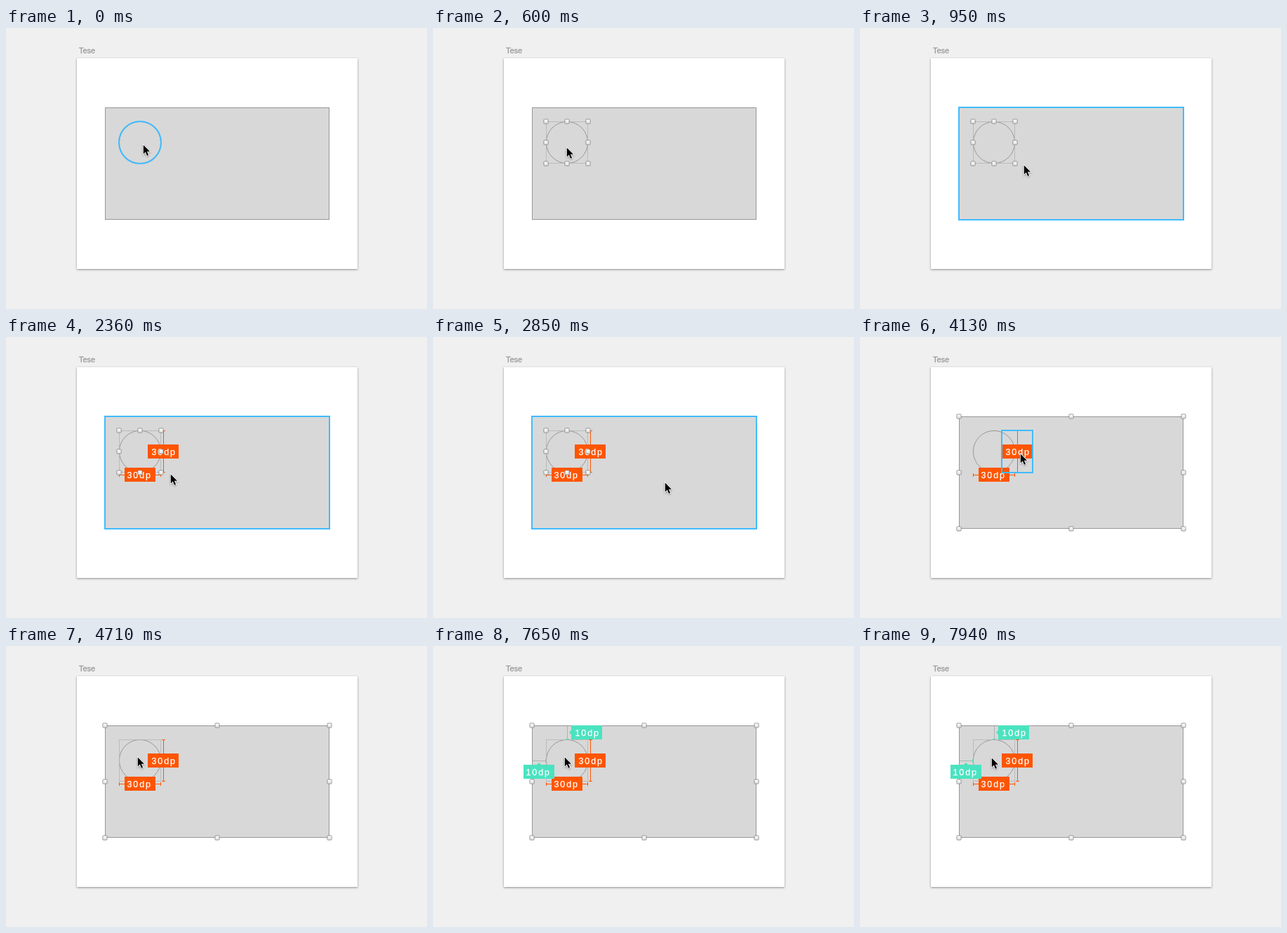
Recreate the animation shown at these times as an HTML page. Size 600 by 400 pixels, loop 8000 ms.

```html
<!DOCTYPE html>
<html>
<head>
<meta charset="utf-8">
<style>
html, body { margin: 0; width: 100%; height: 100%; overflow: hidden; background: #f0f0f0; }
svg { display: block; width: 600px; height: 400px; }
text { font-family: "Liberation Sans", Arial, sans-serif; }
.board { filter: drop-shadow(0 1px 1.5px rgba(0,0,0,.42)); }
.shape { fill: #d8d8d8; stroke: #979797; }
.hover { fill: none; stroke: #40bcff; stroke-width: 2; }
.box { fill: none; stroke: #b5b5b5; stroke-width: .8; }
.handle { fill: url(#knob); stroke: #999; stroke-width: .8; filter: drop-shadow(0 .6px .5px rgba(0,0,0,.3)); }
.size { fill: #ff5500; }
.gap { fill: #4ae3c0; }
.label { font-size: 12.5px; letter-spacing: 1.9px; fill: #fff; stroke: #fff; stroke-width: .25; }
#cursor { filter: drop-shadow(0 1px .8px rgba(0,0,0,.35)); }
</style>
</head>
<body>
<svg viewBox="0 0 600 400">
  <defs>
    <linearGradient id="knob" x2="0" y2="1">
      <stop stop-color="#fff"/><stop offset="1" stop-color="#dedede"/>
    </linearGradient>
  </defs>
  <rect width="600" height="400" fill="#f0f0f0"/>
  <text x="104" y="36" font-size="11" fill="#999" stroke="#999" stroke-width=".3">Tese</text>
  <rect class="board" x="101" y="43" width="400" height="300" fill="#fff"/>
  <rect class="shape" x="141.5" y="113.5" width="319" height="159"/>
  <circle class="shape" cx="191" cy="163" r="29.6"/>
  <rect id="circleBox" class="box" x="161.5" y="133.5" width="59" height="59"/>

  <g id="sizes">
    <path class="size" d="M224 133h1v60h-1z M222 133h5v1h-5z M222 192h5v1h-5z M202 153h44v20h-44z"/>
    <text class="label" x="207.5" y="167.5">30dp</text>
    <path class="size" d="M161 196h60v1h-60z M161 194h1v5h-1z M220 194h1v5h-1z M169 186h44v20h-44z"/>
    <text class="label" x="172.5" y="200.5">30dp</text>
  </g>

  <g id="gaps">
    <path d="M191.5 114v19M142 163.5h19" stroke="#a8b5b1"/>
    <path class="gap" d="M189 132h5v1h-5z M160 161h1v5h-1z"/>
    <path class="gap" d="M197 113h44v20h-44v-7l-3-3 3-3z"/>
    <text class="label" x="202.5" y="127.5">10dp</text>
    <path class="gap" d="M129 169h19l3-3 3 3h19v20h-44z"/>
    <text class="label" x="132.5" y="183.5">10dp</text>
  </g>

  <g id="circleHandles"></g>
  <g id="rectHandles"></g>
  <rect id="rectHover" class="hover" x="141" y="113" width="320" height="160"/>
  <circle id="circleHover" class="hover" cx="191" cy="163" r="30"/>
  <rect id="sizeHover" class="hover" x="202" y="133" width="44" height="60"/>
  <path id="cursor" d="M.8 1.4V14.4L3.8 11.6 6 16.8 8.1 15.9 5.9 10.8H10z" stroke="#fff" stroke-width="1.6" paint-order="stroke"/>
</svg>
<script>
const LOOP = 8000;
const $ = id => document.getElementById(id);
const show = (id, on) => { $(id).style.display = on ? "" : "none"; };

// Eight resize knobs around a box.
function addHandles(id, x, y, w, h) {
  let out = "";
  for (const i of [0, 1, 2]) for (const j of [0, 1, 2]) {
    if (i === 1 && j === 1) continue;
    out += `<rect class="handle" x="${x + w * i / 2 - 3}" y="${y + h * j / 2 - 3}" width="6" height="6" rx=".8"/>`;
  }
  $(id).innerHTML = out;
}
addHandles("circleHandles", 161, 133, 60, 60);
addHandles("rectHandles", 141, 113, 320, 160);

// Pointer moves: first step, last step, step count, destination, ease-out power.
const moves = [
  [60, 240, 3, 190, 169, 1],
  [770, 950, 4, 233, 194, 1.3],
  [2030, 2030, 1, 234, 194, 1],
  [2680, 2850, 4, 330, 206, 1.3],
  [3930, 4130, 5, 228, 165, 1.2],
  [4180, 4530, 8, 187, 157, 2.2],
  [7940, 7940, 1, 187, 158, 1]
];

function pointer(t) {
  let x = 195, y = 165;
  for (const [start, end, count, toX, toY, power] of moves) {
    if (t < start) break;
    const gap = (end - start) / (count - 1) || 1;
    const step = Math.min(count, Math.floor((t - start) / gap + 1e-6) + 1);
    const p = 1 - (1 - step / count) ** power;
    x += (toX - x) * p;
    y += (toY - y) * p;
  }
  return [Math.round(x), Math.round(y)];
}

function draw(t) {
  const [x, y] = pointer(t);
  const inCircle = Math.hypot(x - 191, y - 163) < 30;
  const inSize = x >= 202 && x <= 246 && y >= 133 && y <= 193;
  const circlePicked = t >= 600 && t < 3810;
  const rectPicked = t >= 3810;
  const roaming = rectPicked && t < 4710;

  $("cursor").setAttribute("transform", `translate(${x} ${y})`);
  show("circleBox", circlePicked || t >= 4710);
  show("circleHandles", circlePicked);
  show("rectHandles", rectPicked);
  show("rectHover", circlePicked && !inCircle);
  show("circleHover", t < 600 || roaming && inCircle && !inSize);
  show("sizeHover", roaming && inSize);
  show("sizes", t >= 2360);
  show("gaps", t >= 7650);
}

function tick() {
  draw(performance.now() % LOOP);
  requestAnimationFrame(tick);
}
tick();
</script>
</body>
</html>
```
